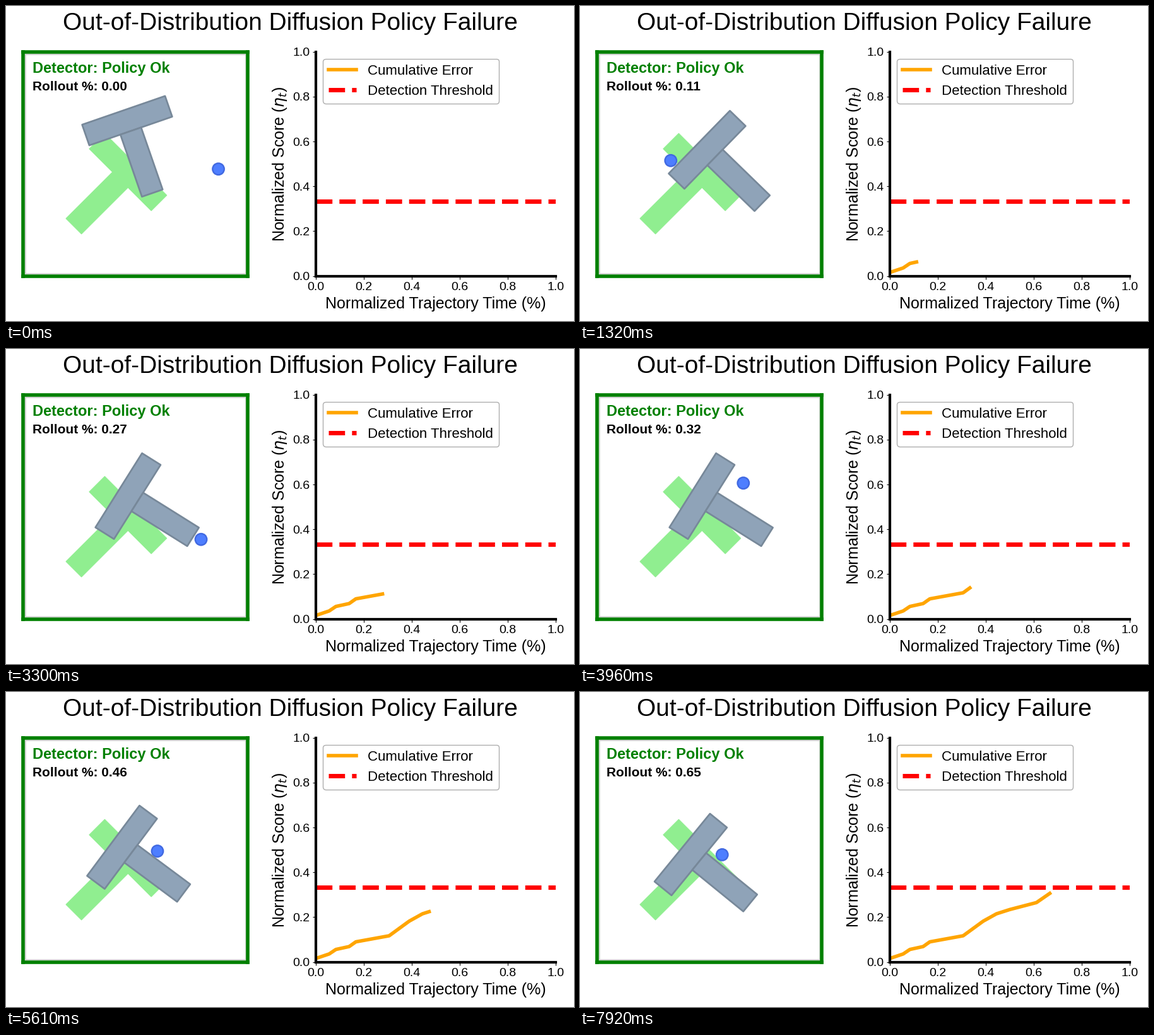
Write a matplotlib script that moves like this. It is 900 px wide and 500 px high and loops after 8 s.

```python
import numpy as np
import matplotlib.pyplot as plt
from matplotlib.animation import FuncAnimation
from matplotlib.patches import Circle, Polygon, Rectangle

W, H, DPI = 900, 500, 100
LOOP_MS, TICK_MS, STEP_MS = 8000, 40, 330
LAST_STEP = LOOP_MS // STEP_MS
PT = 72 / DPI              # points per pixel
UNIT = 356 / 512           # pixels per world unit

plt.rcParams["font.family"] = "Liberation Sans"

# block: x, y of the middle of the bar's outer edge, angle in degrees;
# each push is (first step, last step, x, y, angle)
BLOCK_START = (186.3, 165.6, -19.1)
PUSHES = [
    (3, 4, 189.0, 216.1, -45.8),
    (4, 5, 193.5, 232.0, -56.0),
    (8, 10, 178.6, 224.3, -57.9),
    (14, 15, 174.2, 230.2, -54.7),
    (15, 24, 162.0, 247.0, -50.8),
]

# agent: angle and radius of its orbit round the middle of the scene;
# each leg is (first step, last step, angle, radius)
HUB = (205.3, 250.3)
AGENT_START = (-3.7, 131.5)
LEGS = [
    (0, 3, 132, 112),
    (3, 4, 175.4, 61.7),
    (4, 5, 158, 75),
    (5, 8, -30.5, 138),
    (8, 10, -26.6, 116),
    (10, 12, 35, 65.3),
    (12, 15, 4.1, 41.6),
    (15, 20, -15.5, 24.4),
    (20, 24, -21.8, 21.5),
]

# bends of the error curve: step, score
BENDS = np.array([(0, .016), (2, .036), (3, .056), (5, .069), (6, .090),
                  (11, .117), (14, .182), (16, .215), (18, .234),
                  (22, .265), (24, .306)])


def box(x, y, w, h):
    return np.array([(x, y), (x + w, y), (x + w, y + h), (x, y + h)])


TEE = [box(-100, 0, 200, 50), box(-25, 50, 50, 150)]


def place(shape, x, y, angle):
    a = np.radians(angle)
    c, s = np.cos(a), np.sin(a)
    return shape * UNIT @ np.array([(c, s), (-s, c)]) + (x, y)


def travel(step, start, moves, power=1.0):
    """Run through the moves in turn, each eased out by the given power."""
    value = np.array(start, float)
    for first, last, *goal in moves:
        p = np.clip((step - first) / (last - first), 0, 1)
        value += (goal - value) * (1 - (1 - p) ** power)
    return value


def agent_at(step):
    angle, radius = travel(step, AGENT_START, LEGS)
    a = np.radians(angle)
    return HUB[0] + radius * np.cos(a), HUB[1] - radius * np.sin(a)


def add_plot_axes(x, y, w, h):
    return fig.add_axes([x / W, 1 - (y + h) / H, w / W, h / H])


fig = plt.figure(figsize=(W / DPI, H / DPI), dpi=DPI, facecolor="white")
fig.text(0.5, 1 - 38 / H, "Out-of-Distribution Diffusion Policy Failure",
         fontsize=28, ha="center", va="baseline")

# scene, in stage pixels with y pointing down
scene = add_plot_axes(27, 73, 356, 356)
scene.set(xlim=(27, 383), ylim=(429, 73), xticks=[], yticks=[])
for spine in scene.spines.values():
    spine.set(color="green", linewidth=4)

scene.add_patch(Rectangle((27 + 5 * UNIT, 73 + 5 * UNIT), 503 * UNIT, 501 * UNIT,
                          fill=False, ec="lightgray", lw=2.8 * PT))
for shape in TEE:
    scene.add_patch(Polygon(place(shape, 205.6, 251.3, 45), fc="lightgreen",
                            ec="lightgreen", lw=PT, joinstyle="miter"))

agent = scene.add_patch(Circle(agent_at(0), 9.2, fc=(78 / 255, 126 / 255, 1),
                               ec="royalblue", lw=2.4 * PT))
block = [scene.add_patch(Polygon(shape, fc=(143 / 255, 163 / 255, 184 / 255),
                                 ec="lightslategray", lw=2.7 * PT,
                                 joinstyle="round"))
         for shape in TEE]

scene.text(41.6, 105.5, "Detector: Policy Ok", fontsize=17, weight="bold",
           color="green")
counter = scene.text(41.6, 134, "", fontsize=15, weight="bold")

# score plot
plot = add_plot_axes(491, 72.6, 380, 356)
plot.set(xlim=(0, 1), ylim=(0, 1))
plot.patch.set_visible(False)
curve, = plot.plot([], [], color="orange", lw=4, label="Cumulative Error")
plot.axhline(0.333, color="red", lw=5, ls="--", label="Detection Threshold")
plot.set_xlabel("Normalized Trajectory Time (%)", fontsize=18)
plot.set_ylabel(r"Normalized Score ($\eta_t$)", fontsize=18)
plot.tick_params(labelsize=14)
plot.spines[["top", "right"]].set_visible(False)
plot.spines[["left", "bottom"]].set_linewidth(3)
plot.legend(loc="upper left", fontsize=16, edgecolor="0.6")


def update(frame):
    # the step reached by the end of this tick
    step = min((frame * TICK_MS + TICK_MS - 1) // STEP_MS, LAST_STEP)
    pose = travel(step, BLOCK_START, PUSHES, power=1.7)
    for part, shape in zip(block, TEE):
        part.set_xy(place(shape, *pose))
    agent.center = agent_at(step)
    counter.set_text(f"Rollout %: {step / 37:.2f}")
    steps = np.arange(step + 1)
    curve.set_data(steps / 36, np.interp(steps, *BENDS.T))
    return [*block, agent, counter, curve]


anim = FuncAnimation(fig, update, frames=LOOP_MS // TICK_MS, interval=TICK_MS,
                     init_func=lambda: update(0), repeat=True, repeat_delay=0)
plt.show()
```
